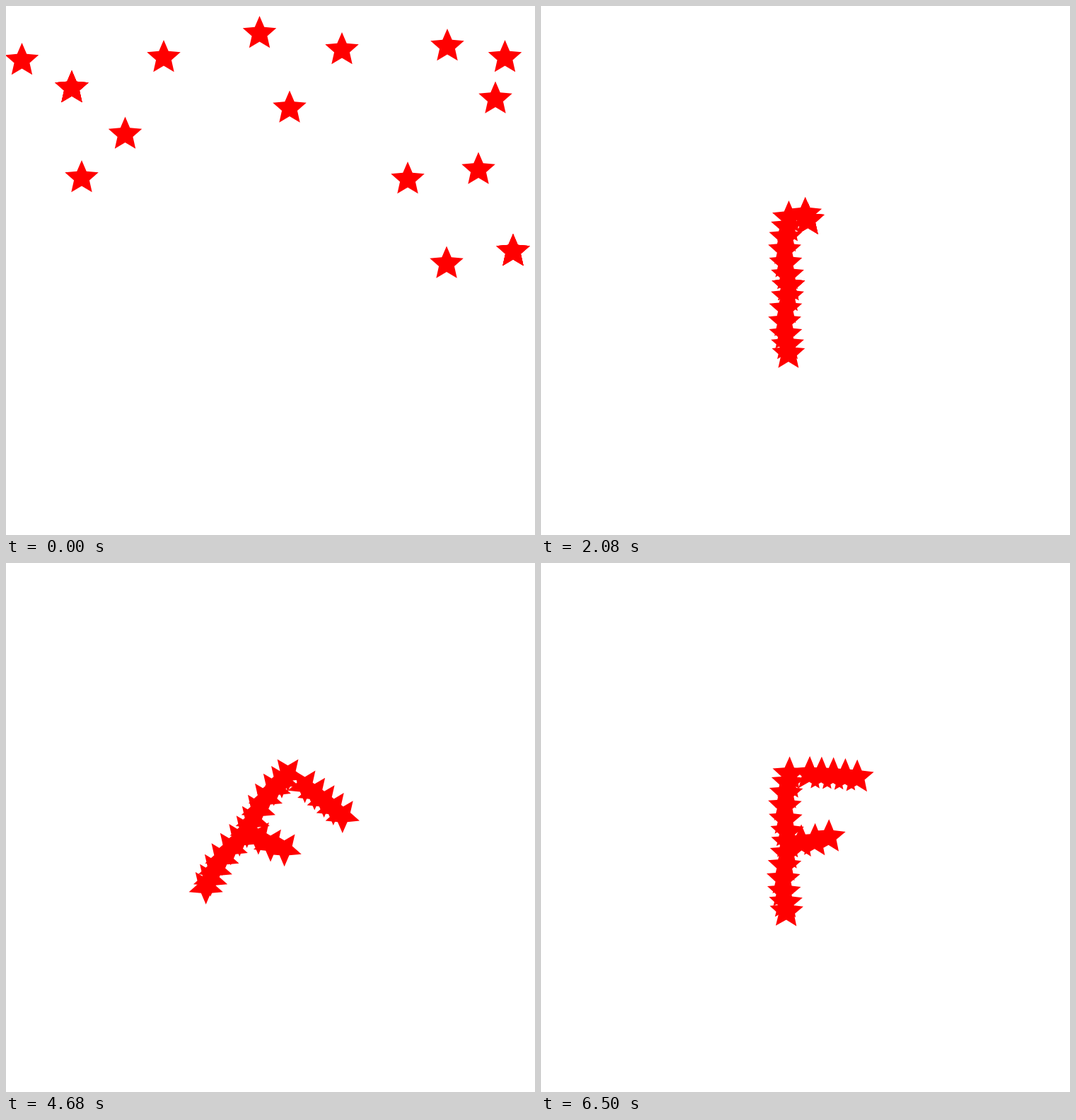
An HTML page with a canvas that plays this animation: 748 px wide and 748 px high, repeating every 6.89 s.

```html
<!DOCTYPE html>
<html lang="en">
<head>
<meta charset="utf-8">
<title>Stars forming a letter</title>
<style>
  html, body { margin: 0; width: 100%; height: 100%; overflow: hidden; background: #fff; }
  canvas { display: block; width: 748px; height: 748px; }
</style>
</head>
<body>
<canvas id="stage" width="748" height="748"></canvas>
<script>
const ctx = document.getElementById('stage').getContext('2d');
const SIZE = 748, MID = SIZE / 2, STEP = 130, STEPS = 53;
const RADIUS = 25, NOTCH = 0.46;

// where the stars lie scattered, in order from the foot of the stem up;
// an optional third value is a delay in steps
const scatter = [
  [475, 62], [107, 243], [568, 245], [22.5, 77], [358.5, 39], [705.5, 73], [93, 116],
  [223, 73], [692, 131.5], [623, 364.5, 2.3], [401, 144.5], [168.5, 181.5], [624, 57]
];
const ARM_SLOT = 6, BAR_SLOT = 15;
const barLead = [668, 231.5], barPile = [717, 347];
const corner = [350, 298];

const clamp = x => Math.min(1, Math.max(0, x));
const ease = x => (1 - Math.cos(Math.PI * clamp(x))) / 2;
const mix = (a, b, p) => a + (b - a) * p;
const mixPoint = (a, b, p) => [mix(a[0], b[0], p), mix(a[1], b[1], p)];

// the letter: a slightly uneven stem, a sagging bar and a rising arm
function stem(k) {
  const a = k * Math.PI / 6;
  return [
    346.8 + 2.7 * Math.cos(2 * a),
    493.5 - 16.2 * k + 3 * Math.sin(a) + 2.5 * Math.sin(2 * a)
  ];
}
const bar = i => [378 + 16.8 * i, 298 + 0.2 * i * i];
const arm = i => [368 + 19.5 * i, 394.5 - 2 * i * i];

// each higher slot takes a little longer to fill
function fly([x, y, delay = 0], target, slot, n) {
  const length = 4.4 + 0.92 * slot + delay;
  return mixPoint([x, y], target, ease((n - 1) / length));
}

function star([x, y]) {
  ctx.beginPath();
  for (let i = 0; i < 10; i++) {
    const a = i * Math.PI / 5 - Math.PI / 2;
    const r = i % 2 ? RADIUS * NOTCH : RADIUS;
    ctx.lineTo(x + r * Math.cos(a), y + r * Math.sin(a));
  }
  ctx.closePath();
  ctx.fill();
}

// scale and turn in degrees: gather, spin once, then swell and shrink
function pose(n) {
  if (n < 28) return [1 - 0.015 * Math.sin(Math.PI * clamp((n - 10) / 12)), 0];
  if (n < 38) return [1.014, -36 * (n - 27)];
  return [Math.max(1, 1.755 - 0.149 * Math.abs(n - 44)), 1.2];
}

function draw(n) {
  ctx.setTransform(1, 0, 0, 1, 0, 0);
  ctx.fillStyle = '#fff';
  ctx.fillRect(0, 0, SIZE, SIZE);

  const [scale, turn] = pose(n);
  ctx.translate(MID, MID);
  ctx.rotate(turn * Math.PI / 180);
  ctx.scale(scale, scale);
  ctx.translate(-MID, -MID);
  ctx.fillStyle = '#f00';

  const placed = scatter.map((from, k) => fly(from, stem(k), k, n));
  placed.forEach(star);

  const spread = ease((n - 16) / 6);
  for (let i = 0; i < 5; i++) {
    const at = fly(i ? barPile : barLead, corner, BAR_SLOT, Math.min(n, 16));
    star(mixPoint(at, bar(i), spread));
  }

  const reach = ease((n - 22.3) / 4.7);
  for (let i = 0; i < 3; i++) star(mixPoint(placed[ARM_SLOT], arm(i), reach));
}

const begin = performance.now();
function tick() {
  const t = Math.max(0, performance.now() - begin);
  draw(Math.floor(t / STEP) % STEPS);
  requestAnimationFrame(tick);
}
tick();
</script>
</body>
</html>
```
